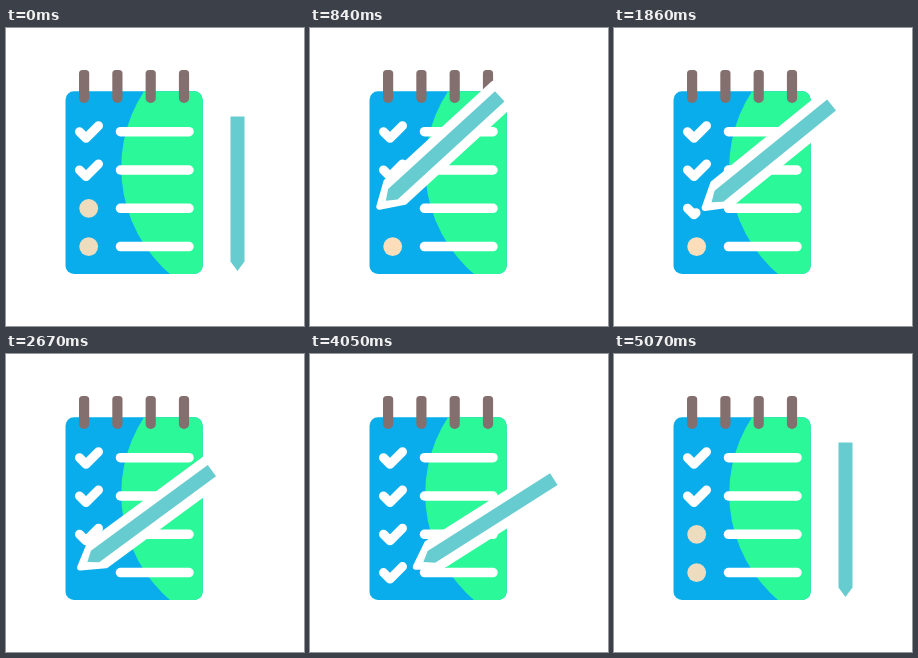
An HTML page with a canvas for the animation above (5.4 s loop, 298 px wide and 298 px high).

```html
<!DOCTYPE html>
<html lang="en">
<head>
<meta charset="utf-8">
<title>Checklist</title>
<style>
  html, body { margin: 0; width: 100%; height: 100%; overflow: hidden; background: #fff; }
  canvas { display: block; width: 298px; height: 298px; }
</style>
</head>
<body>
<canvas id="stage" width="298" height="298"></canvas>
<script>
const ctx = document.getElementById('stage').getContext('2d');
const LOOP = 5400, RESET = 5070, STEP = 30;
const BLUE = '#0aadec', GREEN = '#2bf898', TEAL = '#67ccd0', RING = '#83706e';
const REST = { x: 231.5, y: 255 };
const HOME = 4980;      // the pen is back at rest
const INK_LAG = 120;    // the tick follows the pen by this much
const BEND = 0.34;      // share of a tick drawn before its corner

const rowY = i => 103.7 + 38.3 * i;

// When the pen reaches a row, starts its tick, turns the corner and finishes
const TASKS = [
  { y: rowY(2), arrive: 840, start: 1170, bend: 1680, end: 2040 },
  { y: rowY(3), arrive: 2880, start: 3090, bend: 3570, end: 3930 }
];
const FIRST = TASKS[0].arrive, DONE = TASKS[1].end;

const clamp = v => Math.min(1, Math.max(0, v));
const ramp = (t, from, to) => clamp((t - from) / (to - from));
const ease = u => (1 - Math.cos(Math.PI * u)) / 2;
const mix = (a, b, u) => a + (b - a) * u;

function move(from, to, u, sag = 0) {
  const e = ease(u);
  return {
    x: mix(from.x, to.x, e),
    y: mix(from.y, to.y, e) + sag * Math.sin(Math.PI * u)
  };
}

const tickStart = task => ({ x: 67, y: task.y + 0.5 });
const tickCorner = task => ({ x: 77.5, y: task.y + 10 });
const tickEnd = task => ({ x: 99, y: task.y - 7 });

function penTip(t) {
  let from = REST, left = 0;
  for (const task of TASKS) {
    if (t < task.arrive) return move(from, tickStart(task), ramp(t, left, task.arrive), 4);
    if (t < task.bend) return move(tickStart(task), tickCorner(task), ramp(t, task.start, task.bend));
    if (t < task.end) return move(tickCorner(task), tickEnd(task), ramp(t, task.bend, task.end));
    from = tickEnd(task);
    left = task.end;
  }
  return move(from, REST, ramp(t, left, HOME), 4);
}

function penTilt(t) {
  if (t < FIRST) return 47.5 * ease(t / FIRST);
  if (t < DONE) return mix(47.5, 58, ramp(t, FIRST, DONE));
  return 58 * (1 - ease(ramp(t, DONE, HOME)) ** 1.45);
}

function path(points, close) {
  ctx.beginPath();
  points.forEach(([x, y]) => ctx.lineTo(x, y));
  if (close) ctx.closePath();
}

function box(x, y, w, h, r) {
  ctx.beginPath();
  ctx.roundRect(x, y, w, h, r);
}

function drawPad() {
  ctx.save();
  box(59.5, 63.3, 137.2, 182.7, 8.5);
  ctx.fillStyle = BLUE;
  ctx.fill();
  ctx.clip();
  ctx.beginPath();
  ctx.arc(255, 139.8, 139.8, 0, Math.PI * 2);
  ctx.fillStyle = GREEN;
  ctx.fill();
  ctx.restore();

  for (let i = 0; i < 4; i++) {
    ctx.fillStyle = RING;
    box(73 + 33.3 * i, 42, 10.2, 33, [3.5, 3.5, 5, 5]);
    ctx.fill();

    path([[114.5, rowY(i)], [183, rowY(i)]]);
    ctx.strokeStyle = '#fff';
    ctx.lineWidth = 9.5;
    ctx.stroke();
  }
}

function drawTick(y, progress) {
  if (progress <= 0) return;
  const down = 6.5 * clamp(progress / BEND);
  const up = 12.5 * ramp(progress, BEND, 1);
  const points = [[73.5, y], [73.5 + down, y + down]];
  if (up > 0) points.push([80 + up, y + 6.5 - up]);
  path(points);
  ctx.strokeStyle = '#fff';
  ctx.lineWidth = 9;
  ctx.stroke();
}

function drawDot(y, alpha, color) {
  ctx.globalAlpha = alpha;
  ctx.beginPath();
  ctx.arc(82.7, y, 9.4, 0, Math.PI * 2);
  ctx.fillStyle = color;
  ctx.fill();
  ctx.globalAlpha = 1;
}

// Five-sided pencil outline with its point at the bottom
function pencil(half, top, shoulder, point) {
  path([[-half, -top], [half, -top], [half, -shoulder], [0, -point], [-half, -shoulder]], true);
}

function drawPen(t) {
  const tip = penTip(t);
  ctx.save();
  ctx.translate(tip.x, tip.y);
  ctx.rotate(penTilt(t) * Math.PI / 180);
  pencil(13.5, 170, 25, 3);
  ctx.fillStyle = ctx.strokeStyle = '#fff';
  ctx.lineWidth = 6;
  ctx.fill();
  ctx.stroke();
  pencil(7, 166.5, 21.5, 12);
  ctx.fillStyle = TEAL;
  ctx.fill();
  ctx.restore();
}

function draw(time) {
  const t = time >= RESET ? 0 : time;
  const dotColor = t < 600 ? '#eddcbe' : '#fcdfba';
  ctx.fillStyle = '#fff';
  ctx.fillRect(0, 0, 298, 298);
  ctx.lineCap = ctx.lineJoin = 'round';
  drawPad();
  drawTick(rowY(0), 1);
  drawTick(rowY(1), 1);
  for (const { y, arrive, start, bend, end } of TASKS) {
    const ink = t - INK_LAG;
    drawDot(y, 1 - ramp(t, arrive - 330, arrive - 210), dotColor);
    drawTick(y, BEND * ramp(ink, start, bend) + (1 - BEND) * ramp(ink, bend, end));
  }
  drawPen(t);
}

const begin = performance.now();
function tick() {
  const elapsed = (performance.now() - begin) % LOOP;
  draw(Math.floor(elapsed / STEP) * STEP);
  requestAnimationFrame(tick);
}
tick();
</script>
</body>
</html>
```
